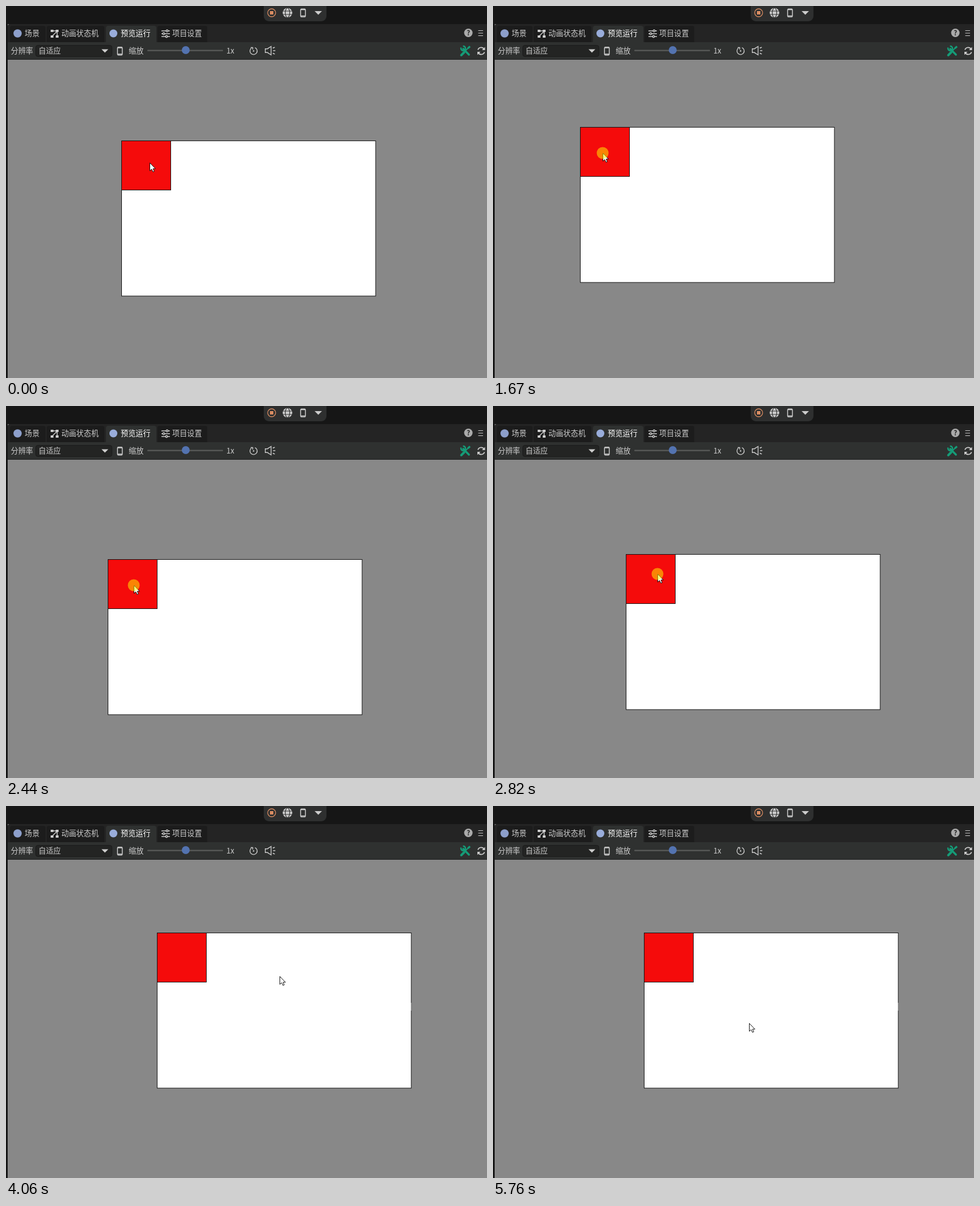
These frames come from a looping animation (851x658 px, 6230 ms). An HTML page:

```html
<!DOCTYPE html>
<html lang="zh-CN">
<head>
<meta charset="utf-8">
<title>预览运行</title>
<style>
  html, body { margin: 0; width: 100%; height: 100%; overflow: hidden; background: #888; }
  svg { display: block; width: 851px; height: 658px; }
  text { font: 13.2px "Noto Sans CJK SC", "Noto Sans CJK", "Noto Sans", sans-serif; fill: #ccc; }
  .line { fill: none; stroke: #ccc; stroke-width: 1.5; }
  .fill { fill: #ccc; }
  .tab { fill: #1c1c1c; }
</style>
</head>
<body>
<svg viewBox="0 0 851 658">
  <defs>
    <g id="phone">
      <rect x=".8" y=".8" width="8.4" height="14" rx="1.5" class="line"/>
      <path d="M1 2H9M1 13H9" class="line"/>
    </g>
  </defs>
  <rect width="851" height="658" fill="#888"/>
  <rect width="851" height="32" fill="#161616"/>
  <rect y="32" width="3" height="626" fill="#161616"/>
  <path d="M3 64V36Q3 32 7 32H851V64Z" fill="#242424"/>
  <rect x="3" y="64" width="848" height="30" fill="#2f3130"/>
  <rect x="3" y="94" width="848" height="1" fill="#1d1d1d"/>

  <!-- run controls -->
  <rect x="456" y="-10" width="111" height="37" rx="9" fill="#2e2f2f"/>
  <circle cx="470" cy="12" r="7" fill="none" stroke="#d98c62" stroke-width="1.3"/>
  <rect x="467" y="9" width="6" height="6" fill="#d98c62"/>
  <circle cx="498" cy="12" r="8.5" class="fill"/>
  <g fill="none" stroke="#2e2f2f" stroke-width="1.2">
    <ellipse cx="498" cy="12" rx="3.9" ry="8.5"/>
    <path d="M489 9H507M489 15H507"/>
  </g>
  <use href="#phone" x="520.5" y="4.5"/>
  <path d="M546 9H559L552.5 15.5Z" class="fill"/>

  <!-- tabs -->
  <path class="tab" d="M7 64V39Q7 35 11 35H66Q70 35 70 39V64Z"/>
  <path class="tab" d="M72 64V39Q72 35 76 35H170Q174 35 174 39V64Z"/>
  <path class="tab" d="M268 64V39Q268 35 272 35H352Q356 35 356 39V64Z"/>
  <path fill="#2f3130" d="M177 64V39Q177 35 181 35H262Q266 35 266 39V64Z"/>
  <circle cx="20.5" cy="48.5" r="7.3" fill="#8d9fcb"/>
  <circle cx="190" cy="48.5" r="7" fill="#99addb"/>
  <path class="fill" d="M79 42H84V46H79ZM88 42H93V46H88ZM79 52H84V56H79ZM88 52H93V56H88Z"/>
  <path class="line" d="M83 44H89M90 45L82 53M90.5 45V53"/>
  <g class="line">
    <path d="M275 44H290M275 49H290M275 54H290"/>
    <g fill="#1c1c1c"><circle cx="285" cy="44" r="1.7"/><circle cx="279" cy="49" r="1.7"/><circle cx="284" cy="54" r="1.7"/></g>
  </g>
  <text x="33" y="53">场景</text>
  <text x="98" y="53">动画状态机</text>
  <text x="203" y="53" style="fill:#fff;font-weight:500">预览运行</text>
  <text x="294" y="53">项目设置</text>
  <circle cx="818" cy="47.5" r="7.5" fill="#aaa"/>
  <text x="818" y="52" text-anchor="middle" style="font-size:12px;font-weight:700;fill:#242424">?</text>
  <path d="M835.5 43.5H844M835.5 48H844M835.5 52.5H844" class="line" style="stroke-width:1.2"/>

  <!-- toolbar -->
  <text x="8.5" y="84">分辨率</text>
  <rect x="52.5" y="69.5" width="135" height="20" rx="4" fill="#232423" stroke="#1b1b1b"/>
  <text x="57.5" y="84">自适应</text>
  <path d="M169 76.5H181L175 82.5Z" class="fill"/>
  <use href="#phone" x="196.5" y="72"/>
  <text x="217" y="84">缩放</text>
  <rect x="250" y="77.5" width="134" height="2.5" rx="1" fill="#565856"/>
  <circle cx="318" cy="78" r="7" fill="#5373b0"/>
  <text x="390" y="84">1x</text>
  <path d="M434 74.5A6.4 6.4 0 1 0 440.5 73.6M433 73.5H436.5V77" class="line" style="stroke-width:1.4"/>
  <circle cx="438" cy="79.5" r="1.3" class="fill"/>
  <path d="M458.7 75.7H462.5L469 71.5V86.5L462.5 82.3H458.7Z" class="line" style="stroke-width:1.4"/>
  <path d="M472 74.5L475.5 73M472.5 79H476.5M472 83.5L475.5 85" class="line"/>
  <g fill="none" stroke="#159c78">
    <path d="M809 76L819 86" stroke-width="3.6" stroke-linecap="round"/>
    <path d="M805.2 73.5A4 4 0 1 0 808.5 71" stroke-width="2.6"/>
    <path d="M812.5 79.5L820 72" stroke-width="2"/>
    <path d="M817 75L821 71.5" stroke-width="3.2"/>
    <path d="M805.5 87L810.5 82" stroke-width="4" stroke-linecap="round"/>
  </g>
  <path d="M835 77.5A6 6 0 0 1 846 76.5M846.5 81.5A6 6 0 0 1 835.5 82.5" class="line" style="stroke-width:1.8"/>
  <path d="M847.5 72.5V78H842ZM834 86.5V81H839.5Z" class="fill"/>

  <!-- dragged panel -->
  <g id="panel" stroke="#111" transform="translate(204 238)">
    <rect x=".5" y=".5" width="449.5" height="274.5" fill="#fff"/>
    <rect x=".5" y=".5" width="87" height="87" fill="#f50b0b"/>
    <path id="nick" d="M449.5 124V138" stroke="#ccc" stroke-width="1.5" visibility="hidden"/>
  </g>
  <g id="cursor" transform="translate(254 277)">
    <path d="M.5 .5V14.5L3.7 11.6L6 16.4L8.3 15.4L6.2 10.8H10.4Z" fill="#fff" stroke="#111"/>
    <circle id="press" cx="0" cy="0" r="10.5" fill="#ff0" fill-opacity=".5" visibility="hidden"/>
  </g>
</svg>
<script>
const LOOP = 6230, START = 500, STEP = 77.2;
const GRAB = [42, 43], RELEASE = 35, LAST = 68;

// Rows are [step, ...values]
const panelKeys = [
  [0, 204, 238], [3, 207, 206], [6, 204, 215], [7, 203, 214], [8, 193, 217],
  [12, 166, 204], [15, 154, 214], [16, 152, 217], [21, 160, 247], [25, 180, 271],
  [26, 184, 274], [27, 190, 278], [30, 235, 262], [33, 267, 236], [35, 267, 224]
];
const approachKeys = [[-5, 254, 277], [-2, 246, 281]];
// Loop the pointer makes after release: centre and radii
const orbitKeys = [
  [42, 488, 348, 111, 47], [50, 488, 348, 111, 47], [55, 508, 359, 85, 37],
  [59, 508, 356, 85, 38], [65, 466, 361, 77, 36], [68, 466, 361, 77, 23.4]
];

const $ = id => document.getElementById(id);
const panel = $('panel'), cursor = $('cursor'), press = $('press'), nick = $('nick');

// Monotone cubic interpolation, without overshoot
function sample(keys, k) {
  const end = keys.length - 1;
  if (k <= keys[0][0]) return keys[0].slice(1);
  if (k >= keys[end][0]) return keys[end].slice(1);
  let i = 0;
  while (keys[i + 1][0] <= k) i++;
  const slope = (j, c) => j < 0 || j >= end ? 0 :
    (keys[j + 1][c] - keys[j][c]) / (keys[j + 1][0] - keys[j][0]);
  const tangent = (j, c) => {
    const a = slope(j - 1, c), b = slope(j, c);
    return a * b <= 0 ? 0 : 2 * a * b / (a + b);
  };
  const a = keys[i], b = keys[i + 1], h = b[0] - a[0], u = (k - a[0]) / h, v = 1 - u;
  return a.slice(1).map((_, n) => {
    const c = n + 1;
    return a[c] * (1 + 2 * u) * v * v + b[c] * u * u * (3 - 2 * u) +
      h * u * v * (tangent(i, c) * v - tangent(i + 1, c) * u);
  });
}

function orbit(k) {
  const [cx, cy, rx, ry] = sample(orbitKeys, k);
  const angle = (-79 + (k - 55) * 539 / 13) * Math.PI / 180;
  return [cx + rx * Math.cos(angle), cy + ry * Math.sin(angle)];
}

function pointer(k) {
  if (k < 0) return sample(approachKeys, k);
  const held = sample(panelKeys, k + 1).map((v, i) => v + GRAB[i]);
  if (k <= RELEASE + 1) return held;
  const u = Math.min(1, (k - RELEASE - 1) / 6), mix = u * u * (3 - 2 * u);
  return orbit(k).map((v, i) => held[i] + (v - held[i]) * mix);
}

function place(node, point) {
  node.setAttribute('transform', `translate(${point.map(Math.round).join(' ')})`);
}

const show = (node, on) => node.setAttribute('visibility', on ? 'visible' : 'hidden');

function draw() {
  const t = performance.now() % LOOP;
  const k = Math.min(LAST, Math.floor((t - START) / STEP));
  place(panel, sample(panelKeys, k));
  place(cursor, pointer(k));
  show(press, k >= 0 && k < RELEASE);
  show(nick, k >= RELEASE);
  requestAnimationFrame(draw);
}
draw();
</script>
</body>
</html>
```
